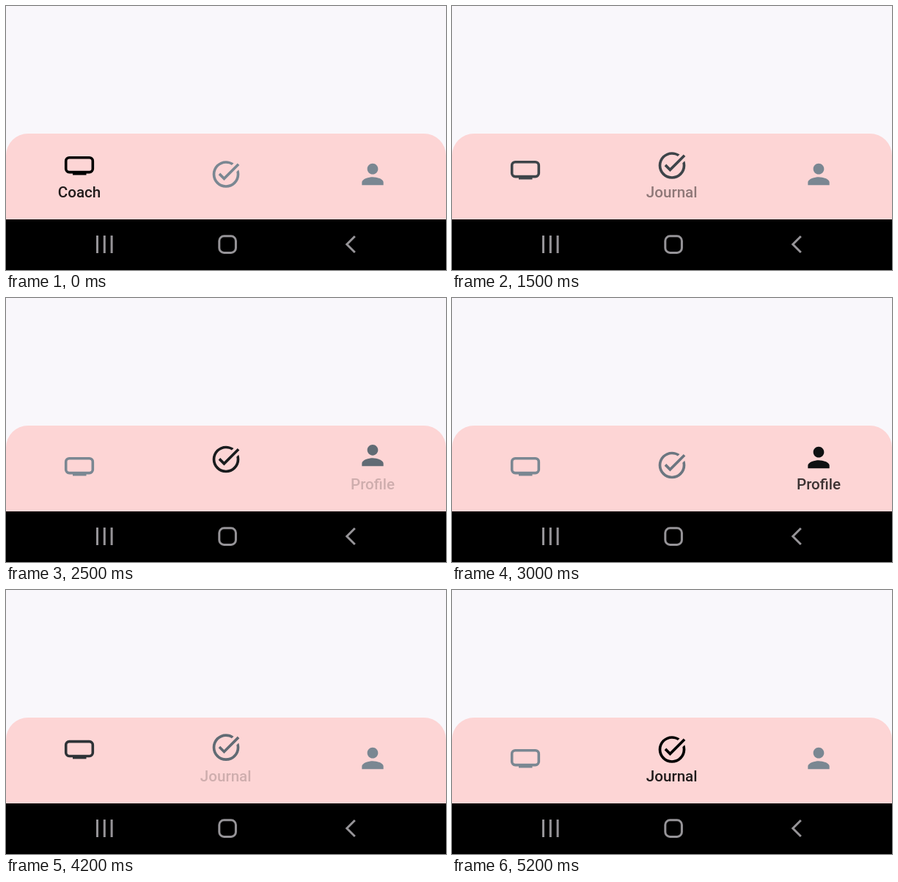
These frames come from a looping animation (600 px wide and 360 px high, 5.3 s). An HTML page:

```html
<!DOCTYPE html>
<html lang="en">
<head>
<meta charset="utf-8">
<title>Bottom navigation</title>
<style>
  html, body { margin: 0; width: 100%; height: 100%; overflow: hidden; background: #f9f7fb; }
  svg { display: block; width: 600px; height: 360px; }
  text { font: 500 20.6px Roboto, sans-serif; text-anchor: middle; fill: #000; }
  .line { fill: none; stroke: #969498; stroke-width: 3; }
</style>
</head>
<body>
<svg viewBox="0 0 600 360">
  <rect width="600" height="360" fill="#f9f7fb"/>
  <path d="M0 291V204A30 30 0 0 1 30 174H570A30 30 0 0 1 600 204V291Z" fill="#fdd5d5"/>
  <rect y="291" width="600" height="69"/>

  <g class="tab">
    <g class="icon">
      <rect x="81.7" y="218.8" width="36.6" height="19.8" rx="4.6" fill="none" stroke="currentColor" stroke-width="3.6"/>
      <path d="M91 239H109.5V242.5H91Z" fill="currentColor"/>
    </g>
    <text x="100" y="261.3">Coach</text>
  </g>
  <g class="tab">
    <g class="icon">
      <path transform="translate(278 207.5) scale(1.8333)" fill="currentColor" d="M22 5.18L10.59 16.6l-4.24-4.24 1.41-1.41 2.83 2.83 10-10L22 5.18zM19.79 10.22C19.92 10.79 20 11.39 20 12c0 4.42-3.58 8-8 8s-8-3.58-8-8 3.58-8 8-8c1.58 0 3.04.46 4.28 1.25l1.44-1.44C16.1 2.67 14.13 2 12 2 6.48 2 2 6.48 2 12s4.48 10 10 10 10-4.48 10-10c0-1.19-.22-2.33-.6-3.39l-1.61 1.61z"/>
    </g>
    <text x="299.7" y="261.3">Journal</text>
  </g>
  <g class="tab">
    <g class="icon">
      <path transform="translate(478 207.5) scale(1.8333)" fill="currentColor" d="M12 12c2.21 0 4-1.79 4-4s-1.79-4-4-4-4 1.79-4 4 1.79 4 4 4zm0 2c-2.67 0-8 1.34-8 4v2h16v-2c0-2.66-5.33-4-8-4z"/>
    </g>
    <text x="500" y="261.3">Profile</text>
  </g>

  <path class="line" d="M124.5 313V337M134.3 313V337M144.1 313V337"/>
  <rect class="line" x="290.8" y="313.8" width="22.6" height="22.6" rx="6.5"/>
  <path class="line" d="M475.8 314L464.8 325L475.8 336"/>
</svg>
<script>
const LOOP = 5300, STEP = 100, FADE = 750, LIFT = 12;
const IDLE = [122, 135, 146];
const TAPS = [[1125, 1], [2345, 2], [3425, 0], [4045, 1]]; // [time, tab]

const tabs = [...document.querySelectorAll('.tab')].map(el => ({
  icon: el.querySelector('.icon'),
  label: el.querySelector('text')
}));

const clamp = v => Math.min(1, Math.max(0, v));
const elasticOut = t => t <= 0 ? 0 : t >= 1 ? 1
  : 1 + 2 ** (-10 * t) * Math.sin((t - 0.1) * Math.PI * 5);

// Rising is elastic and falling linear; an interrupted rise falls back along its own curve.
function pose(tab, now) {
  let on = tab === 0, v = on ? 1 : 0, elastic = false, last = 0;
  const advance = to => {
    v = clamp(v + (on ? 1 : -1) * (to - last) / FADE);
    last = to;
  };
  for (const [at, target] of TAPS) {
    if (at > now) break;
    advance(at);
    on = target === tab;
    if (v === 0 || v === 1) elastic = on;
  }
  advance(now);
  return { on, v, rise: elastic ? elasticOut(v) : v };
}

function draw(now) {
  tabs.forEach(({ icon, label }, i) => {
    const { on, v, rise } = pose(i, now);
    icon.setAttribute('transform', `translate(0 ${-LIFT * rise})`);
    icon.style.color = `rgb(${IDLE.map(c => Math.round(c * (1 - v)))})`;
    label.style.opacity = on ? 0.87 * v : 0;
  });
}

const start = performance.now();
function tick() {
  const t = (performance.now() - start) % LOOP;
  draw(Math.floor(t / STEP) * STEP);
  requestAnimationFrame(tick);
}
draw(0);
requestAnimationFrame(tick);
</script>
</body>
</html>
```
